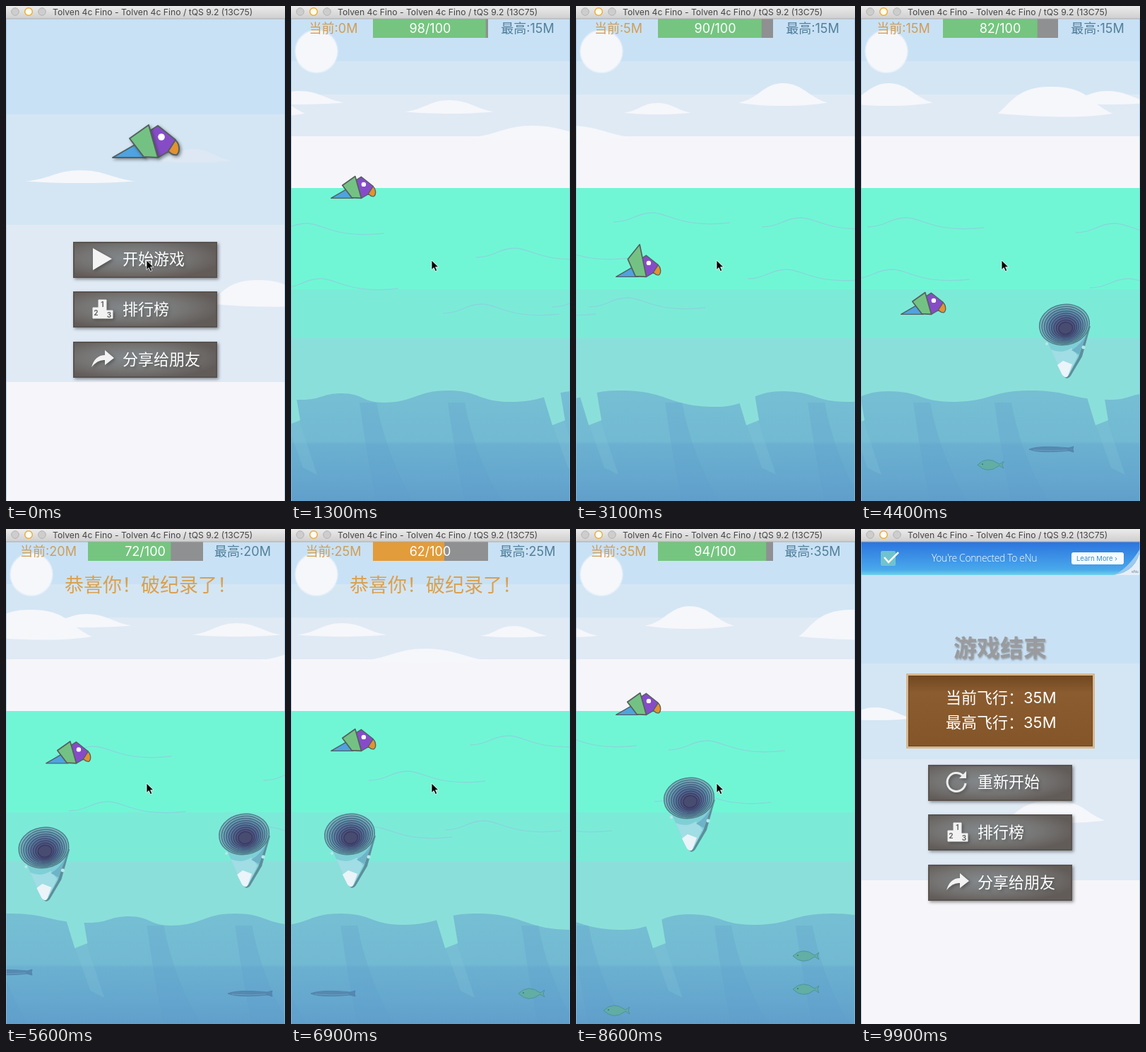
An HTML page that plays this animation: 395x699 px, repeating every 10 s.

```html
<!DOCTYPE html>
<html lang="zh">
<head>
<meta charset="utf-8">
<title>Flying bird game</title>
<style>
html, body { margin: 0; width: 100%; height: 100%; overflow: hidden; background: #c9e1f5; }
svg { display: block; width: 100%; height: 100%; }
text { font-family: Inter, "Noto Sans CJK SC", "Noto Sans CJK", sans-serif; }
.bar { font: 12.2px Inter, sans-serif; fill: #444; }
.hud { font-size: 18px; text-anchor: middle; }
.label { font-size: 22px; font-weight: 500; fill: #fff; }
.score { font-size: 22px; fill: #fff; }
.over { font-size: 33px; font-weight: 700; fill: #999b9e; filter: drop-shadow(1px 2px 1px #777a); }
.record { font: 500 27px "Noto Sans CJK SC", "Noto Sans CJK", sans-serif; fill: #dba04c; }
.ad { font: 300 14px "Open Sans", sans-serif; letter-spacing: -.4px; fill: #fff; }
.more { font: 9.5px Inter, sans-serif; fill: #3a8dcc; }
.digit { font: 700 10px Inter, sans-serif; fill: #666; text-anchor: middle; }
.shadow { filter: drop-shadow(2px 2px 2px #3338); }
</style>
</head>
<body>
<svg viewBox="0 0 395 699" preserveAspectRatio="none">
  <defs>
    <linearGradient id="chrome" x2="0" y2="1"><stop stop-color="#ebebeb"/><stop offset="1" stop-color="#cfcfcf"/></linearGradient>
    <linearGradient id="adFill" x2="0" y2="1"><stop stop-color="#2b74de"/><stop offset=".85" stop-color="#4aa9ec"/><stop offset="1" stop-color="#70d2ea"/></linearGradient>
    <linearGradient id="wood" x2="0" y2="1"><stop stop-color="#6f471f"/><stop offset=".25" stop-color="#8b5c30"/><stop offset="1" stop-color="#835528"/></linearGradient>
    <radialGradient id="stone" cx=".42" cy=".45" r=".62"><stop stop-color="#858b8f"/><stop offset=".6" stop-color="#757473"/><stop offset="1" stop-color="#625c59"/></radialGradient>
    <linearGradient id="deep" gradientUnits="userSpaceOnUse" x1="0" x2="0" y1="540" y2="699">
      <stop stop-color="#76bfd3"/><stop offset=".47" stop-color="#72b9d2"/><stop offset=".5" stop-color="#6bb0d0"/><stop offset=".8" stop-color="#65a7ce"/><stop offset="1" stop-color="#609fca"/>
    </linearGradient>
    <g id="bird" stroke="#53605f" stroke-width="2" stroke-linejoin="round">
      <path d="M1-1L34-20L48-1Z" fill="#4ea3e0"/>
      <path d="M88-27C96-22 97-10 92-5C88-4 84-6 81-9L73-8Z" fill="#e2922f"/>
      <path d="M54-39L65-46L90-26L79-9L65-1Z" fill="#864cc8"/>
      <circle cx="70" cy="-30" r="4.8" fill="#fff" stroke="none"/>
    </g>
    <path id="wing" d="M25-28L52-47L65-1L45-2Z"/>
    <path id="wingUp" d="M26-38L51-69L65-1L42-2Z"/>
    <g id="fish" stroke="#4a919a" stroke-width="1" opacity=".88">
      <path d="M-18 0Q-4-14 13-1L19-5L17 0L19 5L13 1Q-4 14-18 0Z" fill="#62ae9f"/>
      <circle cx="-11" cy="-1" r="1" fill="#356f80" stroke="none"/>
    </g>
    <g id="eel" stroke="#4a7aa3" stroke-width=".8" opacity=".88">
      <path d="M-32 0Q-18-6 24-2L31-4L30 0L31 4L24 2Q-18 6-32 0Z" fill="#5484ac"/>
      <path d="M-26 1Q0 3 22 1" fill="none" stroke="#6fa5c0"/>
    </g>
    <g id="whirl">
      <path d="M-25 18L-2 71Q3 80 9 72L25 45L37 2Z" fill="#5b8f9b"/>
      <path d="M-28 14L-4 70Q2 78 6 71L20 46L34 4Z" fill="#7fcfd6"/>
      <path d="M-19 35Q-4 42 10 33L19 44L6 71Q2 78-4 70Z" fill="#a0dde4"/>
      <path d="M-10 57L-2 51L11 56L5 72Q2 77-3 71Z" fill="#eaf4f9"/>
      <path d="M10 36Q24 28 32 12L21 42Z" fill="#6fb3c8"/>
      <circle cx="27" cy="32" r="2.500" fill="#b9e8ea"/><circle cx="-25" cy="27" r="2" fill="#b9e8ea"/>
      <g id="rings" transform="rotate(-10)"></g>
    </g>
    <path id="cursor" d="M0 0V13.5L3.200 10.600L5.400 15.600L7.800 14.600L5.600 9.700H10Z" fill="#000" stroke="#fff" stroke-width=".8"/>
    <g id="podium" class="shadow">
      <path d="M123 426H131V415H142V430H151V441H123Z" fill="#f2f2f2" stroke="#f2f2f2" stroke-linejoin="round"/>
      <text class="digit" x="136.500" y="425">1</text><text class="digit" x="127.500" y="437">2</text><text class="digit" x="146" y="440">3</text>
    </g>
    <path id="share" class="shadow" d="M121 510Q126 493 140 493V486L153 497L140 507V500Q130 499 121 510Z" fill="#f2f2f2"/>
    <rect id="panel" x="96" y="334" width="202" height="49" fill="url(#stone)" stroke="#59524e" stroke-width="2" class="shadow"/>
    <g id="buttons">
      <use href="#panel"/><use href="#panel" y="70"/><use href="#panel" y="141"/>
      <use href="#podium"/><use href="#share"/>
      <text class="label shadow" x="165" y="436">排行榜</text>
      <text class="label shadow" x="165" y="507">分享给朋友</text>
    </g>
    <g id="skyTile"></g>
    <g id="seaTile"></g>
  </defs>

  <g id="game">
    <g id="gameSky"></g>
    <circle cx="36" cy="64" r="31" fill="#fff" opacity=".35"/>
    <circle cx="36" cy="64" r="29.500" fill="#f6f7fb"/>
    <g class="scroll" data-tile="skyTile"></g>
    <g id="water"></g>
    <g class="scroll" data-tile="seaTile"></g>
    <g id="actors"></g>
    <g id="player"><use href="#bird"/><use id="flap" href="#wing" fill="#74c283" stroke="#53605f" stroke-width="2.500" stroke-linejoin="round"/></g>
    <text class="record" id="record" x="83" y="89">恭喜你！破纪录了！</text>
    <rect x="116" y="18" width="163" height="27" fill="#8f9091"/>
    <rect id="fuel" x="116" y="18" height="27"/>
    <text class="hud" id="energy" x="197" y="37.500" fill="#fff"></text>
    <text class="hud" id="now" x="60" y="37.500" fill="#d19d55"></text>
    <text class="hud" id="best" x="335" y="37.500" fill="#517f9b"></text>
  </g>

  <g id="menu">
    <g id="menuSky"></g>
    <g id="menuClouds"></g>
    <use href="#bird" class="shadow" x="150" y="215"/>
    <use href="#wing" class="shadow" x="150" y="215" fill="#74c283" stroke="#53605f" stroke-width="2" stroke-linejoin="round"/>
    <use href="#buttons"/>
    <path class="shadow" d="M123 342L150 357L123 373Z" fill="#f4f4f4"/>
    <text class="label shadow" x="165" y="365">开始游戏</text>
  </g>

  <g id="over">
    <g id="overSky"></g>
    <g id="overClouds"></g>
    <rect y="18" width="395" height="47" fill="url(#adFill)"/>
    <path d="M395 28Q391 60 358 65H395Z" fill="#e6eff8"/>
    <path d="M395 28Q391 60 358 65Q378 56 395 28Z" fill="#9cc9ec"/>
    <text x="383" y="62" font-size="5" fill="#678">eNu</text>
    <rect x="28" y="31" width="21" height="21" rx="2" fill="#6fc3cf"/>
    <path d="M33 40L39 47L53 33" fill="none" stroke="#fff" stroke-width="2.500"/>
    <text class="ad" x="100" y="46">You're Connected To eNu</text>
    <rect x="298" y="33" width="74" height="17" rx="3" fill="#f7fbff"/>
    <text class="more" x="305" y="45">Learn More ›</text>
    <text class="over" x="131" y="180">游戏结束</text>
    <rect x="65.500" y="205.500" width="264" height="103" fill="url(#wood)" stroke="#d8b78e" stroke-width="3"/>
    <rect x="67.500" y="207.500" width="260" height="99" fill="none" stroke="#5c3a18" opacity=".6"/>
    <text class="score" x="120" y="246">当前飞行：35M</text>
    <text class="score" x="120" y="281">最高飞行：35M</text>
    <use href="#buttons"/>
    <g class="shadow" fill="none" stroke="#eee" stroke-width="3">
      <path d="M144 348A13 13 0 1 0 148 359"/><path d="M149 342V352H139Z" fill="#eee" stroke="none"/>
    </g>
    <text class="label shadow" x="165" y="365">重新开始</text>
  </g>

  <use id="pointer" href="#cursor" x="199" y="359"/>
  <path d="M.5 18V699M394.500 18V699" stroke="#8fbfe6" opacity=".6"/>
  <rect width="395" height="18" fill="url(#chrome)"/>
  <path d="M0 18H395" stroke="#aaa"/>
  <g fill="#cdcdcd" stroke="#b3b3b3"><circle cx="13" cy="8" r="5.300"/><circle cx="51" cy="8" r="5.300"/><circle cx="32" cy="8" r="5.300" fill="#fffdf6" stroke="#efab35" stroke-width="1.500"/></g>
  <text class="bar" x="66" y="13">Tolven 4c Fino - Tolven 4c Fino / tQS 9.2 (13C75)</text>
</svg>

<script>
const $ = id => document.getElementById(id);
const LOOP = 10000, STEP = 100, TILE = 943, SPEED = 0.1955, FISH_SPEED = 0.22;

// Stacked flat bands: pairs of top edge and colour
const bands = list => list.map(([y, c]) => `<rect y="${y}" width="395" height="${699 - y}" fill="${c}"/>`).join('');
const SKY = ['#c9e1f5', '#d4e6f4', '#e0eaf5', '#f6f6fa'];
const sky = edges => bands(edges.map((y, i) => [y, SKY[i]]));

// Unit cloud outlines, apex at the origin
const PEAK = 'M-.5 .86C-.28 .72-.22 0 0 0S.3 .66 .5 .86C.2 1.05-.2 1.05-.5 .86Z';
const DOME = 'M-.5 .86C-.4 .6-.34 .02-.06 0C.3-.02 .28 .5 .5 .86C.2 1.05-.2 .95-.5 .86Z';
function cloud(x, y, w, h, shape = PEAK, fill = '#f6f7fb') {
  return `<path transform="translate(${x} ${y}) scale(${w} ${h})" fill="${fill}" d="${shape}"/>`;
}

$('gameSky').innerHTML = sky([18, 78, 125, 184]);
$('menuSky').innerHTML = sky([18, 153, 309, 531]);
$('overSky').innerHTML = sky([18, 190, 325, 496]);
$('water').innerHTML = bands([[257, '#71f6d5'], [400, '#7bebd8'], [469, '#8bdfda']]);
$('menuClouds').innerHTML = cloud(265, 202, 108, 19, PEAK, '#dde8f4') + cloud(105, 232, 155, 18) + cloud(362, 387, 150, 39, DOME);
$('overClouds').innerHTML = cloud(275, 384, 140, 32, DOME) + cloud(20, 252, 110, 18);

$('skyTile').innerHTML = [
  [-421, 133, 126, 19], [-303, 169, 185, 20], [-178, 137, 95, 16],
  [0, 109, 126, 32], [310, 120, 126, 19], [236, 114, 163, 44, DOME]
].map(c => cloud(...c)).join('');

function seaTile() {
  const swell = [[-515, 560], [-423, 543], [-335, 559], [-230, 543], [-95, 566],
    [0, 544], [90, 559], [200, 543], [313, 556], [370, 547], [429, 560]];
  let d = 'M-515 699V560';
  for (let i = 1; i < swell.length; i++) {
    const [x0, y0] = swell[i - 1], [x, y] = swell[i], m = (x0 + x) / 2;
    d += `C${m} ${y0} ${m} ${y} ${x} ${y}`;
  }
  const shafts = [-548, -423, -167, 35, 150].map(x =>
    `<path d="M${x} 560h24q14 75 52 139h-52q-12-55-24-139Z" fill="#5c9dca" opacity=".25"/>`);
  const rays = [-290, -67, 278].map(x =>
    `<path d="M${x + 14} 588l18-2l25 76l-20-10Z" fill="#83c8d8" opacity=".25"/>
     <path d="M${x} 543h26l7 42l-18 7Z" fill="#8bdfda"/>`);
  const ripples = [[-30, 307], [-50, 380], [-275, 420], [-240, 300], [-383, 350], [-430, 429], [265, 315], [285, 393]].map(([x, y]) =>
    `<path transform="translate(${x} ${y})" d="M0 5C25 5 32-8 55-8S95 14 165 6" fill="none" stroke="#8ccfdc" stroke-width="1.4" opacity=".75"/>`);
  return `<path d="${d}V699Z" fill="url(#deep)"/>` + [...shafts, ...rays, ...ripples].join('');
}
$('seaTile').innerHTML = seaTile();

const scrollers = [...document.querySelectorAll('.scroll')];
for (const g of scrollers)
  g.innerHTML = [-1, 0, 1].map(k => `<use href="#${g.dataset.tile}" x="${k * TILE}"/>`).join('');

// Nested ellipses that sink and darken towards the eye
$('rings').innerHTML = Array.from({ length: 9 }, (_, i) => {
  const fill = `hsl(${186 + i * 6} ${38 - i * 2}% ${62 - i * 3.2}%)`;
  const line = `hsl(${192 + i * 6} 28% ${43 - i * 1.5}%)`;
  return `<ellipse cx="${i * .1}" cy="${i * .65}" rx="${35.5 - i * 3.2}" ry="${28.5 - i * 2.5}" fill="${fill}" stroke="${line}" stroke-width="1.5"/>`;
}).join('');

// Kind, x at the given time, y, time, optional moment it is eaten
const actors = [
  ['whirl', 288, 450, 4400], ['whirl', 83, 431, 6900], ['whirl', 160, 380, 8600],
  ['fish', 183, 648, 4400], ['eel', 270, 626, 4400], ['eel', 60, 656, 6900], ['fish', 340, 656, 6900, 7900],
  ['fish', 325, 603, 8600], ['fish', 325, 650, 8600], ['fish', 57, 680, 8600]
].map(([kind, x, y, at, eaten = LOOP]) => {
  const el = document.createElementNS('http://www.w3.org/2000/svg', 'use');
  el.setAttribute('href', '#' + kind);
  $('actors').append(el);
  return { el, x, y, at, eaten, speed: kind === 'whirl' ? SPEED : FISH_SPEED };
});

const HEIGHT = [[1000, 255], [1300, 272], [1900, 330], [2400, 300], [3100, 383], [3700, 350], [4400, 436], [5000, 360],
  [5500, 330], [6200, 360], [6900, 314], [7300, 380], [7900, 660], [8600, 263], [9100, 410]];
const ENERGY = [[1000, 100], [1300, 98], [3100, 90], [4400, 82], [6900, 62], [7800, 58], [7900, 100], [8600, 94], [9100, 90]];

const linear = k => k;
const smooth = k => (1 - Math.cos(Math.PI * k)) / 2;
function track(keys, t, ease) {
  const i = keys.findIndex(k => k[0] > t);
  if (i === 0) return keys[0][1];
  if (i < 0) return keys[keys.length - 1][1];
  const [t0, a] = keys[i - 1], [t1, b] = keys[i];
  return a + (b - a) * ease((t - t0) / (t1 - t0));
}
const clamp = v => Math.max(0, Math.min(1, v));
const move = (el, x, y, more = '') => el.setAttribute('transform', `translate(${x} ${y})${more}`);
function fade(id, alpha) {
  $(id).style.opacity = alpha;
  $(id).style.display = alpha ? '' : 'none';
}

function draw(t) {
  fade('menu', t < 800 ? 1 : clamp((1000 - t) / 300));
  fade('over', t < 9100 ? 0 : clamp((t - 9000) / 300));
  fade('pointer', t < 9100 ? 1 : 0);
  move($('overClouds'), 0.06 * (9900 - t), 0);

  const play = Math.min(t, 9100);
  const x = ((645 - SPEED * (play - 1300)) % TILE + TILE) % TILE;
  for (const g of scrollers) move(g, x, 0);
  for (const a of actors) {
    move(a.el, a.x - a.speed * (play - a.at), a.y);
    a.el.style.display = play < a.eaten ? '' : 'none';
  }
  move($('player'), 56, track(HEIGHT, play, smooth), ' scale(.67)');
  $('flap').setAttribute('href', play / STEP % 4 === 3 ? '#wingUp' : '#wing');

  const energy = 2 * Math.round(track(ENERGY, play, linear) / 2);
  $('fuel').setAttribute('width', 1.63 * energy);
  $('fuel').setAttribute('fill', energy < 70 ? '#e29c3b' : '#75c580');
  $('energy').textContent = energy + '/100';
  const metres = 5 * Math.max(0, Math.floor((play - 1100) / 1050));
  $('now').textContent = `当前:${metres}M`;
  $('best').textContent = `最高:${Math.max(15, metres)}M`;
  fade('record', t >= 5300 && t < 7300 ? 1 : 0);
}

const start = performance.now();
function tick() {
  const t = (performance.now() - start) % LOOP;
  draw(Math.floor(t / STEP) * STEP);
  requestAnimationFrame(tick);
}
tick();
</script>
</body>
</html>
```
